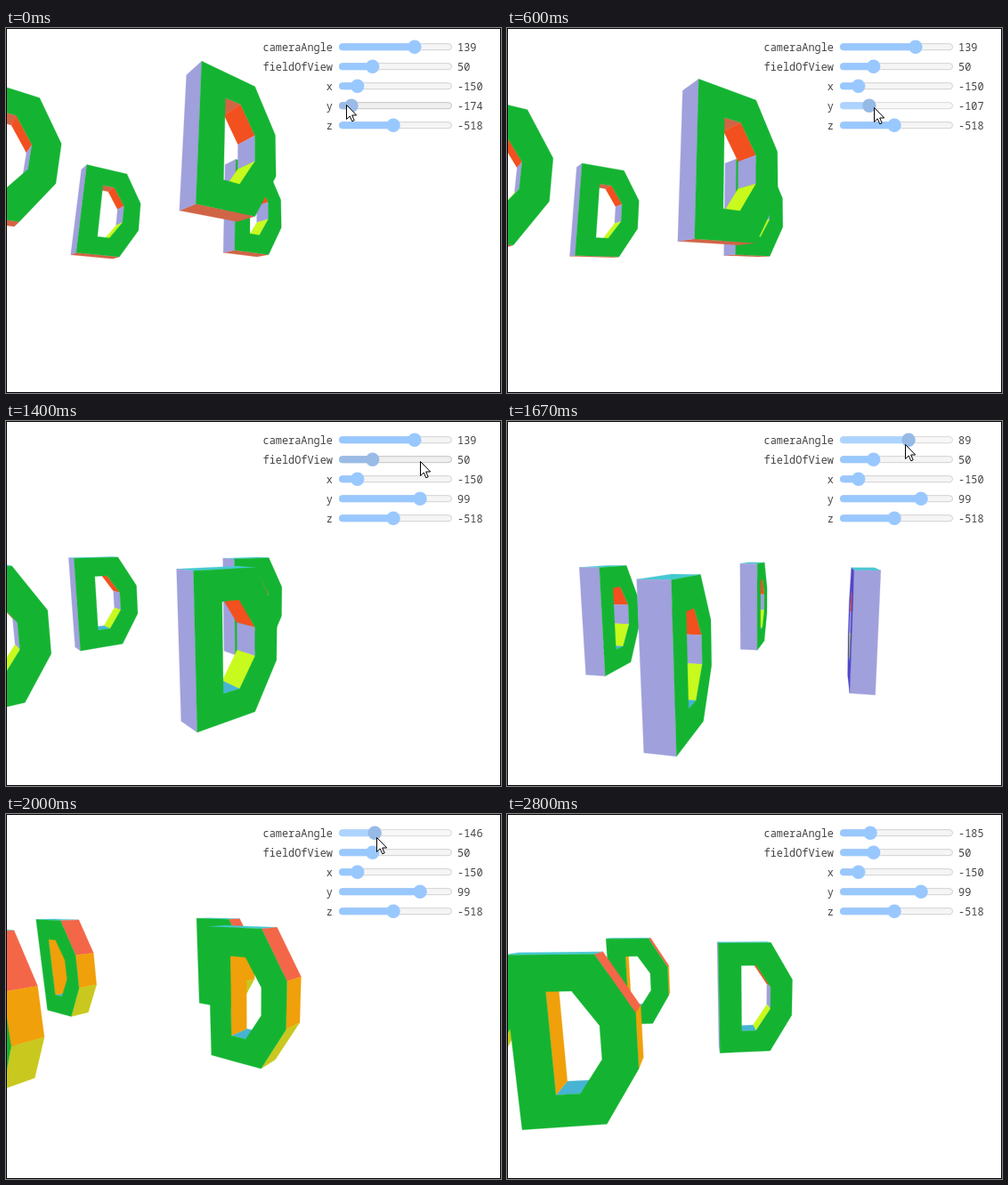
An HTML page for the animation above (3270 ms loop, 556 by 410 pixels).

```html
<!DOCTYPE html>
<html lang="en">
<head>
<meta charset="utf-8">
<title>Orbiting camera</title>
<style>
  html, body { margin: 0; width: 100%; height: 100%; overflow: hidden; background: #fff; }
  svg { display: block; width: 556px; height: 410px; }
  text { font: 11.9px "Noto Sans Mono", "Liberation Mono", monospace; fill: #444; }
</style>
</head>
<body>
<svg viewBox="0 0 556 410">
  <rect width="556" height="410" fill="#fff"/>
  <g id="scene" stroke-width=".3" stroke-linejoin="round"></g>
  <g id="panel"></g>
  <path id="cursor" d="M.5 .5V16.5L4.2 13L6.8 18.8L9.2 17.8L6.7 12H11.7Z" fill="#fff" stroke="#000"/>
  <rect x=".5" y=".5" width="555" height="409" fill="none" stroke="#000"/>
</svg>
<script>
const LOOP = 3270, STEP = 1000 / 15;
const LETTER_COUNT = 4, RADIUS = 180, HALF_DEPTH = 15;
const CENTER_X = 278, CENTER_Y = 205, VIEW_HEIGHT = 408;
const $ = id => document.getElementById(id);

// Clockwise from the top left: straight stem, bevelled bowl
const bowl = (left, bevel, right, top, side) =>
  [[left, top], [bevel, top], [right, side], [right, -side], [bevel, -top], [left, -top]];
const outer = bowl(-50, 20, 50, 75, 25);
const hole = bowl(-20, 0, 20, 45, 15);
const outerColors = ['#46c8d2', '#f46648', '#f0a00a', '#c8c81e', '#d26446', '#a0a0dc'];
const holeColors = ['#d26446', '#f2501e', '#a0a0dc', '#c8fa1e', '#46b4d2', '#f0a00a'];
const FRONT = '#14b432', BACK = '#5046c8';
const letters = Array.from({ length: LETTER_COUNT }, (_, i) => {
  const a = i * 2 * Math.PI / LETTER_COUNT;
  return [RADIUS * Math.cos(a), RADIUS * Math.sin(a)];
});

// Smootherstep from 0 to 1 between two times, in steps
function ease(step, from, to) {
  const u = Math.min(1, Math.max(0, (step - from) / (to - from)));
  return u * u * u * (10 - 15 * u + 6 * u * u);
}

const viewAt = step => ({
  cameraAngle: Math.round(139 - 324 * ease(step, 21.68, 33)),
  fieldOfView: 50,
  x: -150,
  y: Math.round(-174 - 17 * ease(step, 1, 3.85) + 290 * ease(step, 3.85, 17.3)),
  z: -518
});

const mouseAt = step => {
  const leave = ease(step, 32, 43);
  return {
    x: Math.round(382 - 4 * ease(step, 0, 4) + 88 * ease(step, 2.7, 17)
      - 55 * ease(step, 19, 33.5) - 283 * leave),
    y: Math.round(86 + 6 * ease(step, 3, 16) - 66 * ease(step, 17, 23.5) + 365 * leave),
    visible: step < 42
  };
};

function draggedSlider(step) {
  if (step >= 1 && step <= 17) return 'y';
  return step >= 23 && step <= 32 ? 'cameraAngle' : '';
}

// The camera turns with its offset and always looks at the first letter
function makeCamera({ cameraAngle, fieldOfView, x, y, z }) {
  const a = cameraAngle * Math.PI / 180, cos = Math.cos(a), sin = Math.sin(a);
  const eyeX = x * cos + z * sin, eyeZ = z * cos - x * sin;
  const dx = RADIUS - eyeX, dz = -eyeZ;
  const flat = Math.hypot(dx, dz), dist = Math.hypot(flat, y);
  const fx = dx / flat, fz = dz / flat, sinPitch = y / dist, cosPitch = flat / dist;
  const focal = VIEW_HEIGHT / 2 / Math.tan(fieldOfView * Math.PI / 360);
  const project = (px, py, pz) => {
    const rx = px - eyeX, ry = py - y, rz = pz - eyeZ;
    const ahead = rx * fx + rz * fz;
    const scale = focal / (ahead * cosPitch - ry * sinPitch);
    return [CENTER_X + (rz * fx - rx * fz) * scale,
      CENTER_Y - (ry * cosPitch + ahead * sinPitch) * scale];
  };
  const range = ([px, pz]) => Math.hypot(px - eyeX, pz - eyeZ);
  return { project, range };
}

const area = pts => pts.reduce((sum, [x, y], i) => {
  const [nx, ny] = pts[(i + 1) % pts.length];
  return sum + x * ny - nx * y;
}, 0);
const outline = pts => 'M' + pts.map(p => p.map(v => v.toFixed(2)).join(' ')).join('L') + 'Z';
const shape = (d, color) => `<path d="${d}" fill="${color}" stroke="${color}" fill-rule="evenodd"/>`;

function drawLetter([cx, cz], project) {
  const place = (pts, z) => pts.map(([x, y]) => project(cx + x, y, cz + z));
  const walls = (front, back, colors, facing) => front.map((p, i) => {
    const j = (i + 1) % front.length;
    const quad = [p, front[j], back[j], back[i]];
    return area(quad) * facing > 0 ? shape(outline(quad), colors[i]) : '';
  }).join('');
  const outFront = place(outer, HALF_DEPTH), outBack = place(outer, -HALF_DEPTH);
  const inFront = place(hole, HALF_DEPTH), inBack = place(hole, -HALF_DEPTH);
  let svg = walls(inFront, inBack, holeColors, 1) + walls(outFront, outBack, outerColors, -1);
  if (area(outFront) > 0) svg += shape(outline(outFront) + outline(inFront), FRONT);
  if (area(outBack) < 0) svg += shape(outline(outBack) + outline(inBack), BACK);
  return svg;
}

function drawScene(view) {
  const { project, range } = makeCamera(view);
  return [...letters].sort((a, b) => range(b) - range(a))
    .map(letter => drawLetter(letter, project)).join('');
}

const sliders = [['cameraAngle', -360, 360], ['fieldOfView', 1, 179],
  ['x', -200, 200], ['y', -200, 200], ['z', -1000, 0]];
const looks = {
  normal: { fill: '#99c8ff', knob: '#99c8ff', track: '#f5f5f5', edge: '#d2d2d2' },
  hover: { fill: '#9abbe6', knob: '#9abbe6', track: '#efefef', edge: '#c4c4c4' },
  active: { fill: '#add4ff', knob: '#97b9e6', track: '#f8f8f8', edge: '#d8d8d8' }
};
const rowY = row => 21 + row * 22;

function drawSlider([name, min, max], row, value, state) {
  const cy = rowY(row), mid = cy + .2;
  const knob = 380.6 + 113 * (value - min) / (max - min);
  const look = looks[state];
  return `<text x="367" y="${cy + 5}" text-anchor="end">${name}</text>
    <rect x="374.5" y="${mid - 3.5}" width="126" height="7" rx="3.5" fill="${look.track}" stroke="${look.edge}"/>
    <rect x="374" y="${mid - 4}" width="${knob - 374}" height="8" rx="4" fill="${look.fill}"/>
    <circle cx="${knob}" cy="${mid}" r="7.7" fill="${look.knob}"/>
    <text x="507" y="${cy + 5}">${value}</text>`;
}

function draw(step) {
  const view = viewAt(step), mouse = mouseAt(step), dragged = draggedSlider(step);
  const stateOf = (name, row) => {
    if (dragged) return name === dragged ? 'active' : 'normal';
    const over = mouse.visible && mouse.x >= 373 && mouse.x <= 502
      && Math.abs(mouse.y - rowY(row)) <= 8;
    return over ? 'hover' : 'normal';
  };
  $('scene').innerHTML = drawScene(view);
  $('panel').innerHTML = sliders.map((slider, row) =>
    drawSlider(slider, row, view[slider[0]], stateOf(slider[0], row))).join('');
  $('cursor').setAttribute('transform', `translate(${mouse.x} ${mouse.y})`);
  $('cursor').setAttribute('visibility', mouse.visible ? 'visible' : 'hidden');
}

const start = performance.now();
let shown = -1;
function tick() {
  const step = Math.floor(((performance.now() - start) % LOOP + 5) / STEP);
  if (step !== shown) draw(shown = step);
  requestAnimationFrame(tick);
}
tick();
</script>
</body>
</html>
```
